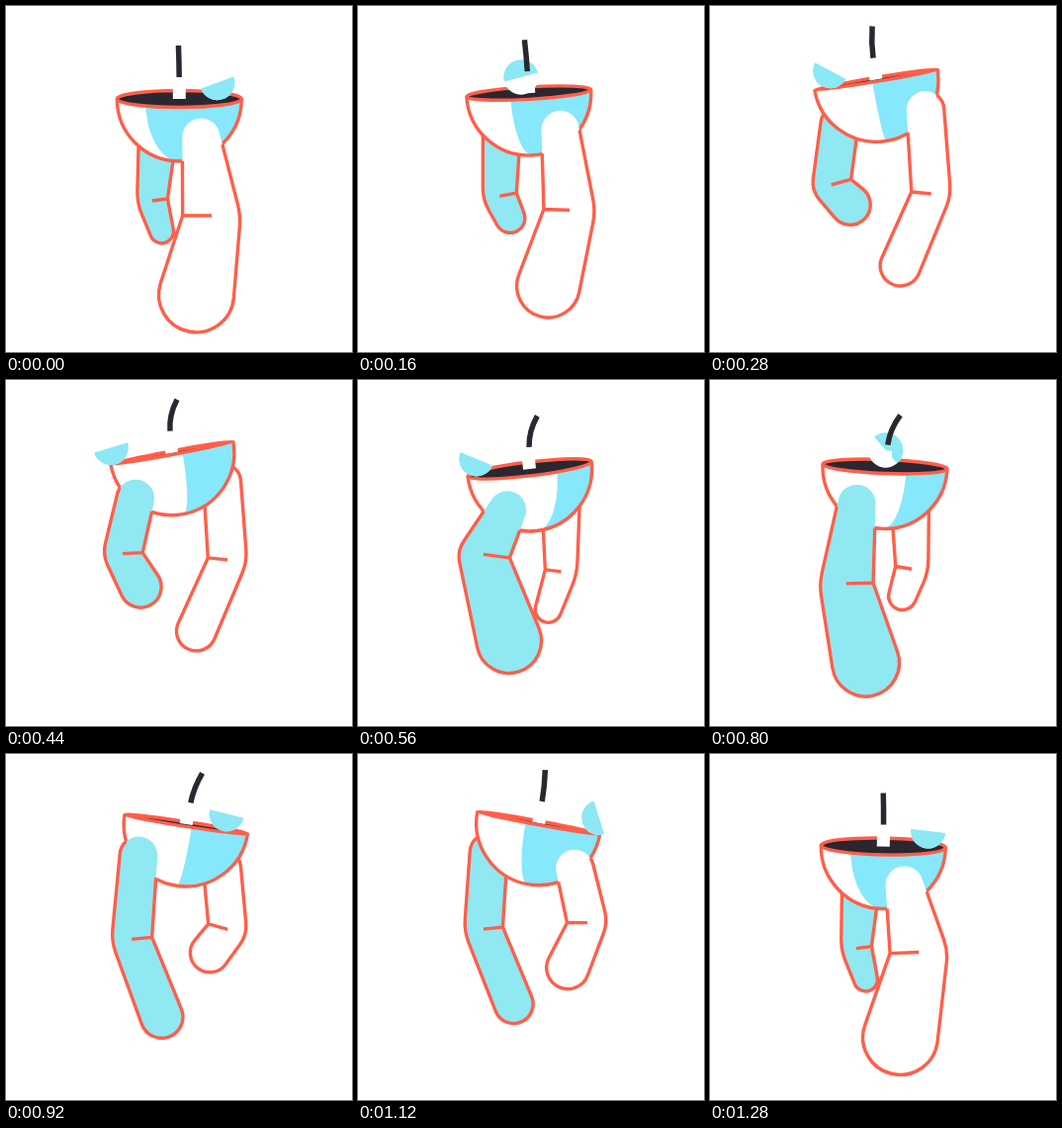
An HTML page that plays this animation: 350 by 350 pixels, repeating every 1320 ms.

```html
<!DOCTYPE html>
<html lang="en">
<head>
<meta charset="utf-8">
<title>Walking bowl</title>
<style>
  html, body { margin: 0; width: 100%; height: 100%; overflow: hidden; background: #fff; }
  svg { display: block; width: 100vw; height: 100vh; }
  .line { fill: none; stroke: #ff5f4a; stroke-width: 3.4; stroke-linejoin: round; }
</style>
</head>
<body>
<svg viewBox="0 0 350 350">
  <defs>
    <clipPath id="outside"><path id="hole" clip-rule="evenodd"
      d="M-600-600H600V600H-600Z M-63 0A63 63 0 0 0 63 0Z"/></clipPath>
  </defs>
  <g id="back"></g>
  <g id="bowl">
    <path d="M-63 0A63 63 0 0 0 63 0Z" fill="#fff"/>
    <path id="shade" fill="#86e8fa"/>
    <path class="line" d="M-63 0A63 63 0 0 0 63 0"/>
    <ellipse id="rim" class="line" rx="63" style="fill:#2a2730"/>
    <g id="disc">
      <circle r="17.7" fill="#fff"/>
      <path d="M0-17.7A17.7 17.7 0 0 1 0 17.7Z" fill="#8ce8f4"/>
    </g>
    <rect x="-6.5" y="-16" width="13" height="16" fill="#fff"/>
    <path id="stem" fill="none" stroke="#2a2730" stroke-width="5.5"/>
  </g>
  <g id="front"></g>
</svg>
<script>
const LOOP = 1320, HALF = LOOP / 2, STEP = 40, SWAP = 370;
const RAD = Math.PI / 180;
const $ = id => document.getElementById(id);
const set = (el, attrs) => { for (const k in attrs) el.setAttribute(k, attrs[k]); };
const cos = deg => Math.cos(deg * RAD);

// Smooth step from 0 to 1 between times a and b
function ramp(t, a, b) {
  const s = Math.min(1, Math.max(0, (t - a) / (b - a)));
  return s * s * (3 - 2 * s);
}

// The bowl hops once per step and leans to alternate sides
function bowlAt(t) {
  const p = t % HALF, side = t < HALF ? 1 : -1;
  const turn = t / LOOP * 360;
  const hop = ramp(p, 70, 300) * (1 - ramp(p, 450, 610));
  const roll = 62 * cos(turn + 54) + 4 * cos(3 * turn - 60);
  return {
    hop, roll,
    x: 175.3 - side * 7.5 * hop,
    y: 94 - 22.5 * hop + 2.5 * Math.sin(turn * RAD),
    tilt: -10.5 * side * ramp(p, 60, 330) * (1 - ramp(p, 500, 650)),
    shade: -30 * (cos(turn) + .15 * cos(3 * turn)),
    lean: 6 + 9.5 * cos(turn - 166) + 2.5 * cos(3 * turn + 20),
    spin: 4 * roll - 60 - 24 * cos(turn)
  };
}

// Phase 0 plants the foot in front; it drifts back until HALF, then swings forward.
// The shape is for the right side; "side" is -1 for the mirrored leg.
function legAt(p, bowl, side) {
  const push = ramp(p, 60, 380), trail = ramp(p, 440, 600);
  const foot = {
    x: 192.5 + 22 * ramp(p, 740, 1050) * (1 - ramp(p, 1080, 1280)),
    y: 292 - 38 * push - 26 * trail - 27 * ramp(p, 720, 920) + 91 * ramp(p, 1050, LOOP),
    r: 38 - 18 * ramp(p, 70, 300) - 8 * trail + 9 * ramp(p, 720, 980) + 17 * ramp(p, 1100, 1290)
  };
  const land = ramp(p, 1220, LOOP);
  const kneeX = 208 + 16 * ramp(p, 60, 300) - 22 * trail
    + 30 * ramp(p, 760, 1000) - 24 * ramp(p, 1150, LOOP);
  const kneeY = bowl.y + 118 - 17 * ramp(p, 100, 640) - 11 * ramp(p, 1120, 1220) + 28 * land;
  const slant = 4 * ramp(p, 60, 260) + 7 * ramp(p, 740, 930) - 18 * ramp(p, 980, 1220) + 7 * land;
  const half = 9 + .535 * foot.r;

  const a = bowl.tilt * side * RAD, hx = 22 + 22.5 * bowl.hop, hy = 38.5;
  const hip = {
    x: 175 + side * (bowl.x - 175) + hx * Math.cos(a) - hy * Math.sin(a),
    y: bowl.y + hx * Math.sin(a) + hy * Math.cos(a),
    r: 19
  };
  return {
    hip, foot,
    outer: { x: kneeX + half, y: kneeY + slant },
    inner: { x: kneeX - half, y: kneeY }
  };
}

// Angle where a line from point p touches circle c
function touch(p, c, side) {
  const dx = p.x - c.x, dy = p.y - c.y;
  return Math.atan2(dy, dx) + side * Math.acos(Math.min(1, c.r / Math.hypot(dx, dy)));
}
const onCircle = (c, a) => ({ x: c.x + c.r * Math.cos(a), y: c.y + c.r * Math.sin(a) });
const xy = p => `${p.x} ${p.y}`;

function arc(c, from, to) {
  const span = (to - from + 4 * Math.PI) % (2 * Math.PI);
  return `A${c.r} ${c.r} 0 ${span > Math.PI ? 1 : 0} 1 ${xy(onCircle(c, to))}`;
}

function toward(p, q, dist) {
  const k = dist / Math.hypot(q.x - p.x, q.y - p.y);
  return { x: p.x + (q.x - p.x) * k, y: p.y + (q.y - p.y) * k };
}

function makeLeg(fill, shift, side) {
  const g = document.createElementNS("http://www.w3.org/2000/svg", "g");
  const flip = side < 0 ? 'transform="translate(350 0) scale(-1 1)"' : "";
  g.innerHTML = `<path ${flip} fill="${fill}"/>
    <g clip-path="url(#outside)"><path ${flip} class="line"/></g>`;
  const [skin, line] = g.querySelectorAll("path");
  return { g, skin, line, shift, side };
}
const white = makeLeg("#fff", 0, 1);
const blue = makeLeg("#90e8f2", HALF, -1);

function drawLeg(leg, t, bowl) {
  const { hip, foot, outer, inner } = legAt((t + leg.shift) % LOOP, bowl, leg.side);
  const hipOut = touch(outer, hip, -1), hipIn = touch(inner, hip, 1);
  const footOut = touch(outer, foot, 1), footIn = touch(inner, foot, -1);
  const top = onCircle(hip, hipOut), low = onCircle(foot, footOut);
  const d = `M${xy(top)}L${xy(toward(outer, top, 12))}`
    + `Q${xy(outer)} ${xy(toward(outer, low, 12))}L${xy(low)}${arc(foot, footOut, footIn)}`
    + `L${xy(inner)}L${xy(onCircle(hip, hipIn))}${arc(hip, hipIn, hipOut)}Z`;
  const mid = { x: (inner.x + outer.x) / 2, y: (inner.y + outer.y) / 2 };
  set(leg.skin, { d });
  set(leg.line, { d: `${d}M${xy(inner)}L${xy(mid)}` });
}

function draw(t) {
  const bowl = bowlAt(t), { shade, lean } = bowl;
  const transform = `translate(${bowl.x} ${bowl.y}) rotate(${bowl.tilt})`;
  set($("bowl"), { transform });
  set($("hole"), { transform });
  set($("rim"), { ry: 8.5 - 6.6 * bowl.hop });
  set($("shade"), {
    d: `M${shade} 0A${Math.abs(shade)} 63 0 0 ${shade > 0 ? 1 : 0} 0 63A63 63 0 0 0 63 0Z`
  });
  set($("stem"), { d: `M${lean * .15}-22Q${lean * .26}-38 ${lean} ${-54 + lean * lean * .009}` });
  set($("disc"), { transform: `translate(${bowl.roll} -16.5) rotate(${bowl.spin - bowl.tilt})` });

  drawLeg(white, t, bowl);
  drawLeg(blue, t, bowl);
  const blueNear = t >= SWAP && t < SWAP + HALF;
  const [near, far] = blueNear ? [blue, white] : [white, blue];
  if (near.g.parentNode !== $("front")) {
    $("front").append(near.g);
    $("back").append(far.g);
  }
}

function tick(now) {
  draw(Math.floor((now + 2) / STEP) * STEP % LOOP);
  requestAnimationFrame(tick);
}
draw(0);
requestAnimationFrame(tick);
</script>
</body>
</html>
```
